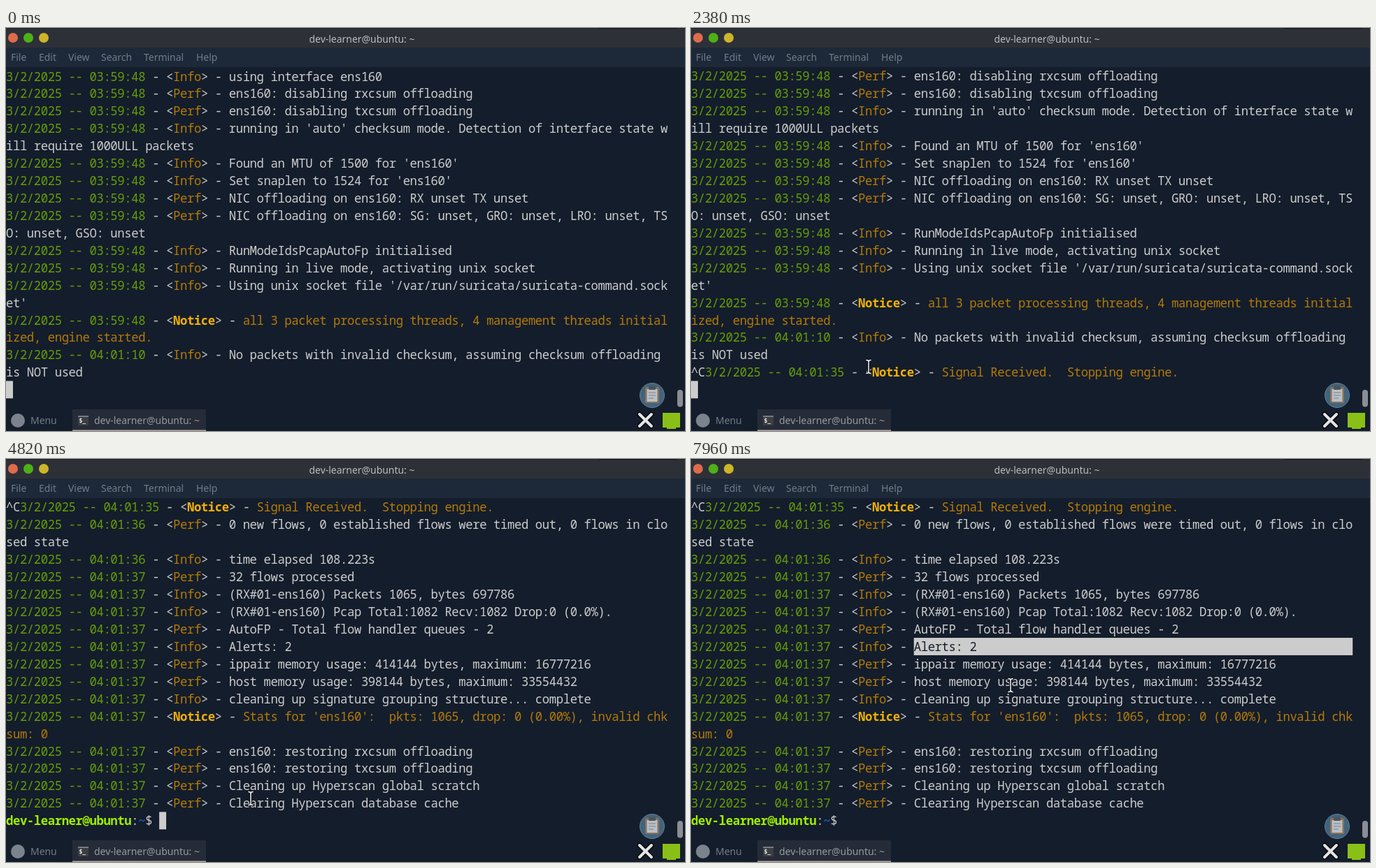
Animation of 971x577 px, one loop 8000 ms. Source, as an HTML page:

```html
<!DOCTYPE html>
<html lang="en">
<head>
<meta charset="utf-8">
<title>Terminal</title>
<style>
html, body { margin: 0; width: 100%; height: 100%; overflow: hidden; background: #141d2b; }
svg { display: block; width: 100vw; height: 100vh; }
text { white-space: pre; }
.ui { font: 13.95px "Noto Sans", sans-serif; }
.mono { font: 17.27px "Noto Sans Mono", monospace; letter-spacing: -0.402px; }
</style>
</head>
<body>
<svg viewBox="0 0 971 577" preserveAspectRatio="none">
  <rect width="971" height="577" fill="#141d2b"/>
  <rect width="971" height="28" fill="#2d3037"/>
  <rect y="28" width="971" height="28" fill="#1d2938"/>
  <rect width="971" height="1" fill="#1d2025"/>
  <rect x="848" width="112" height="1" fill="#0c0e12"/>
  <circle cx="10" cy="14" r="7" fill="#dd6c4c"/>
  <circle cx="32" cy="14" r="7" fill="#4db116"/>
  <circle cx="54" cy="14" r="7" fill="#cdb52a"/>
  <text class="ui" x="509" y="20.5" text-anchor="middle" fill="#b9bcc1">dev-learner@ubuntu: ~</text>
  <g id="menu" class="ui" fill="#727c88"></g>

  <g id="rows" class="mono"></g>
  <rect id="sel" fill="#cccccc"/>
  <text id="selText" class="mono" fill="#141d2b"></text>
  <text id="typed" class="mono" x="0" fill="#cccccc">^C</text>
  <rect id="caret" width="9.96" height="24.93" fill="#cccccc"/>

  <circle cx="17" cy="562" r="10" fill="#7b838c"/>
  <text class="ui" x="35" y="567" fill="#727c88">Menu</text>
  <rect x="95" y="546" width="191" height="31" fill="#252c38"/>
  <rect x="95" y="575.5" width="191" height="1.5" fill="#b9a7a7"/>
  <rect x="103" y="555" width="15" height="14" rx="1" fill="#3b3e42"/>
  <rect x="103" y="555" width="15" height="2" fill="#787b7e"/>
  <text x="104.5" y="565" font-family="DejaVu Sans Mono, monospace" font-size="8" font-weight="700" fill="#eeeeee">$_</text>
  <text class="ui" x="126" y="567" fill="#969ba2">dev-learner@ubuntu: ~</text>

  <circle cx="924" cy="526" r="17.5" fill="#41647c" stroke="#5d8199"/>
  <rect x="914" y="514" width="20" height="23" rx="2" fill="#8c6f58"/>
  <rect x="916.5" y="517" width="15" height="18" fill="#b9c0c6"/>
  <rect x="919" y="512.5" width="10" height="5.5" rx="1.5" fill="#4c535b"/>
  <path d="M919 522h10M919 526h10M919 530h7" stroke="#8d979f" stroke-width="1.4"/>
  <rect x="960" y="518" width="8" height="24.5" rx="4" fill="#8b8f95"/>
  <g stroke-linecap="round">
    <path d="M906 553l17 17M923 553l-17 17" stroke="#05070a" stroke-width="7"/>
    <path d="M906 553l17 17M923 553l-17 17" stroke="#e4e4e4" stroke-width="4"/>
  </g>
  <path d="M939 551h25v21h-6v2h-13v-2h-6z" fill="#8abf18"/>

  <g id="mouse" fill="none" stroke-linecap="square">
    <path d="M-3-9.5Q0-9.5 0-7Q0-9.5 3-9.5M0-7V7M-3 9.5Q0 9.5 0 7Q0 9.5 3 9.5" stroke="#0b0f16" stroke-width="3.6"/>
    <path d="M-3-9.5Q0-9.5 0-7Q0-9.5 3-9.5M0-7V7M-3 9.5Q0 9.5 0 7Q0 9.5 3 9.5" stroke="#f2f2f2" stroke-width="1.5"/>
  </g>
</svg>
<script>
const LOOP = 8000, CW = 9.96, RH = 24.93, TOP = 56.6, BASE = 18.9, COLS = 95, VIEW = 18;
const FG = '#cccccc', GREEN = '#669c08', AMBER = '#b37a08', GOLD = '#f2b008', LIME = '#9fef00', BLUE = '#1464c8';
const $ = id => document.getElementById(id);
const set = (el, attrs) => { for (const k in attrs) el.setAttribute(k, attrs[k]); };
function add(parent, tag, attrs, text) {
  const el = document.createElementNS('http://www.w3.org/2000/svg', tag);
  set(el, attrs);
  if (text) el.textContent = text;
  parent.appendChild(el);
  return el;
}

// One log per line: time, level (I, P or N), message.
const log = `
03:59:48 I using interface ens160
03:59:48 P ens160: disabling rxcsum offloading
03:59:48 P ens160: disabling txcsum offloading
03:59:48 I running in 'auto' checksum mode. Detection of interface state will require 1000ULL packets
03:59:48 I Found an MTU of 1500 for 'ens160'
03:59:48 I Set snaplen to 1524 for 'ens160'
03:59:48 P NIC offloading on ens160: RX unset TX unset
03:59:48 P NIC offloading on ens160: SG: unset, GRO: unset, LRO: unset, TSO: unset, GSO: unset
03:59:48 I RunModeIdsPcapAutoFp initialised
03:59:48 I Running in live mode, activating unix socket
03:59:48 I Using unix socket file '/var/run/suricata/suricata-command.socket'
03:59:48 N all 3 packet processing threads, 4 management threads initialized, engine started.
04:01:10 I No packets with invalid checksum, assuming checksum offloading is NOT used
04:01:35 N Signal Received.  Stopping engine.
04:01:36 P 0 new flows, 0 established flows were timed out, 0 flows in closed state
04:01:36 I time elapsed 108.223s
04:01:37 P 32 flows processed
04:01:37 I (RX#01-ens160) Packets 1065, bytes 697786
04:01:37 I (RX#01-ens160) Pcap Total:1082 Recv:1082 Drop:0 (0.0%).
04:01:37 P AutoFP - Total flow handler queues - 2
04:01:37 I Alerts: 2
04:01:37 P ippair memory usage: 414144 bytes, maximum: 16777216
04:01:37 P host memory usage: 398144 bytes, maximum: 33554432
04:01:37 I cleaning up signature grouping structure... complete
04:01:37 N Stats for 'ens160':  pkts: 1065, drop: 0 (0.00%), invalid chksum: 0
04:01:37 P ens160: restoring rxcsum offloading
04:01:37 P ens160: restoring txcsum offloading
04:01:37 P Cleaning up Hyperscan global scratch
04:01:37 P Clearing Hyperscan database cache`.trim().split('\n');

const rows = [];
// Lays out [text, colour, bold] runs on the grid, wrapping at the last column.
function print(runs) {
  let col = 0, row;
  const newRow = () => {
    row = add($('rows'), 'text', { y: TOP + BASE + rows.length * RH });
    rows.push(row);
    col = 0;
  };
  newRow();
  for (let [text, fill, bold] of runs) {
    while (text) {
      if (col === COLS) newRow();
      const part = text.slice(0, COLS - col);
      add(row, 'tspan', { x: col * CW, fill, 'font-weight': bold ? 700 : 400 }, part);
      col += part.length;
      text = text.slice(part.length);
    }
  }
}

const levels = { I: 'Info', P: 'Perf', N: 'Notice' };
for (const line of log) {
  const time = line.slice(0, 8), level = line[9], msg = line.slice(11), notice = level === 'N';
  print([
    [msg.startsWith('Signal') ? '^C' : '', FG],
    [`3/2/2025 -- ${time}`, GREEN], [' - <', FG],
    [levels[level], notice ? GOLD : AMBER, notice],
    ['> - ', FG], [msg, notice ? AMBER : FG]
  ]);
}
print([['dev-learner@ubuntu', LIME, true], [':', FG], ['~', BLUE, true], ['$ ', FG]]);
const promptRow = rows.length - 1;

const menu = { File: 7, Edit: 47, View: 89, Search: 136, Terminal: 197, Help: 272 };
for (const name in menu) add($('menu'), 'text', { x: menu[name], y: 46.7 }, name);

// [time, value]: the latest entry holds.
const printed = [[0, 18], [2220, 19], [2660, 22], [2940, 30], [3510, 36]];
const caretOff = [[500, 700], [2730, 3250], [3850, 4460], [5040, 5650], [6290, 6890], [7510, 8000]];
const CTRL_C = 700, PROMPT = 3760, DRAG = 6360;
// Pointer path: time, x, y.
const path = [
  [500, 400, 592], [1300, 225, 488], [1430, 225, 488], [1940, 253, 484], [2220, 253, 484],
  [2660, 256, 486], [3020, 335, 488], [3310, 347, 488], [3510, 355, 489], [4100, 339, 486],
  [4600, 339, 484], [4750, 343, 485], [4820, 350, 486], [5040, 350, 486], [5770, 334, 308],
  [6140, 319, 272], [6360, 319, 272], [7080, 416, 267], [7510, 416, 267], [7960, 457, 324]
];
const hold = (keys, t) => keys.filter(k => k[0] <= t).pop()[1];
function pointer(t) {
  const i = path.findIndex(p => p[0] > t);
  if (i < 0) return path[path.length - 1].slice(1);
  if (i === 0) return path[0].slice(1);
  const [a, b] = [path[i - 1], path[i]];
  let u = (t - a[0]) / (b[0] - a[0]);
  u = u * u * (3 - 2 * u);
  return [a[1] + (b[1] - a[1]) * u, a[2] + (b[2] - a[2]) * u];
}

const SEL_COL = 32, SEL_ROW = 8, selMsg = 'Alerts: 2';
const rowTop = r => TOP + r * RH;
set($('sel'), { x: SEL_COL * CW, y: rowTop(SEL_ROW), height: RH });
set($('selText'), { x: SEL_COL * CW, y: rowTop(SEL_ROW) + BASE });
set($('typed'), { y: rowTop(VIEW) + BASE });
set($('caret'), { y: rowTop(VIEW) });
const show = (el, on) => set(el, { visibility: on ? 'visible' : 'hidden' });

function draw(t) {
  const n = hold(printed, t), scroll = n - VIEW, prompt = t >= PROMPT;
  set($('rows'), { transform: `translate(0 ${-scroll * RH})` });
  rows.forEach((row, i) => show(row, i >= scroll && (i < n && i !== promptRow || i === promptRow && prompt)));

  const typed = t >= CTRL_C && n === VIEW;
  show($('typed'), typed);
  set($('caret'), { x: (prompt ? 22 : typed ? 2 : 0) * CW });
  show($('caret'), !caretOff.some(([a, b]) => t >= a && t < b));

  const [x, y] = pointer(t);
  set($('mouse'), { transform: `translate(${Math.round(x)} ${Math.round(y)})` });

  let cols = 0;
  if (t >= DRAG) {
    cols = Math.max(0, Math.round(x / CW) - SEL_COL);
    if (cols >= selMsg.length) cols = COLS - SEL_COL;
  }
  set($('sel'), { width: cols * CW });
  $('selText').textContent = selMsg.slice(0, cols);
}

const start = performance.now();
function tick() {
  draw((performance.now() - start) % LOOP);
  requestAnimationFrame(tick);
}
tick();
</script>
</body>
</html>
```
